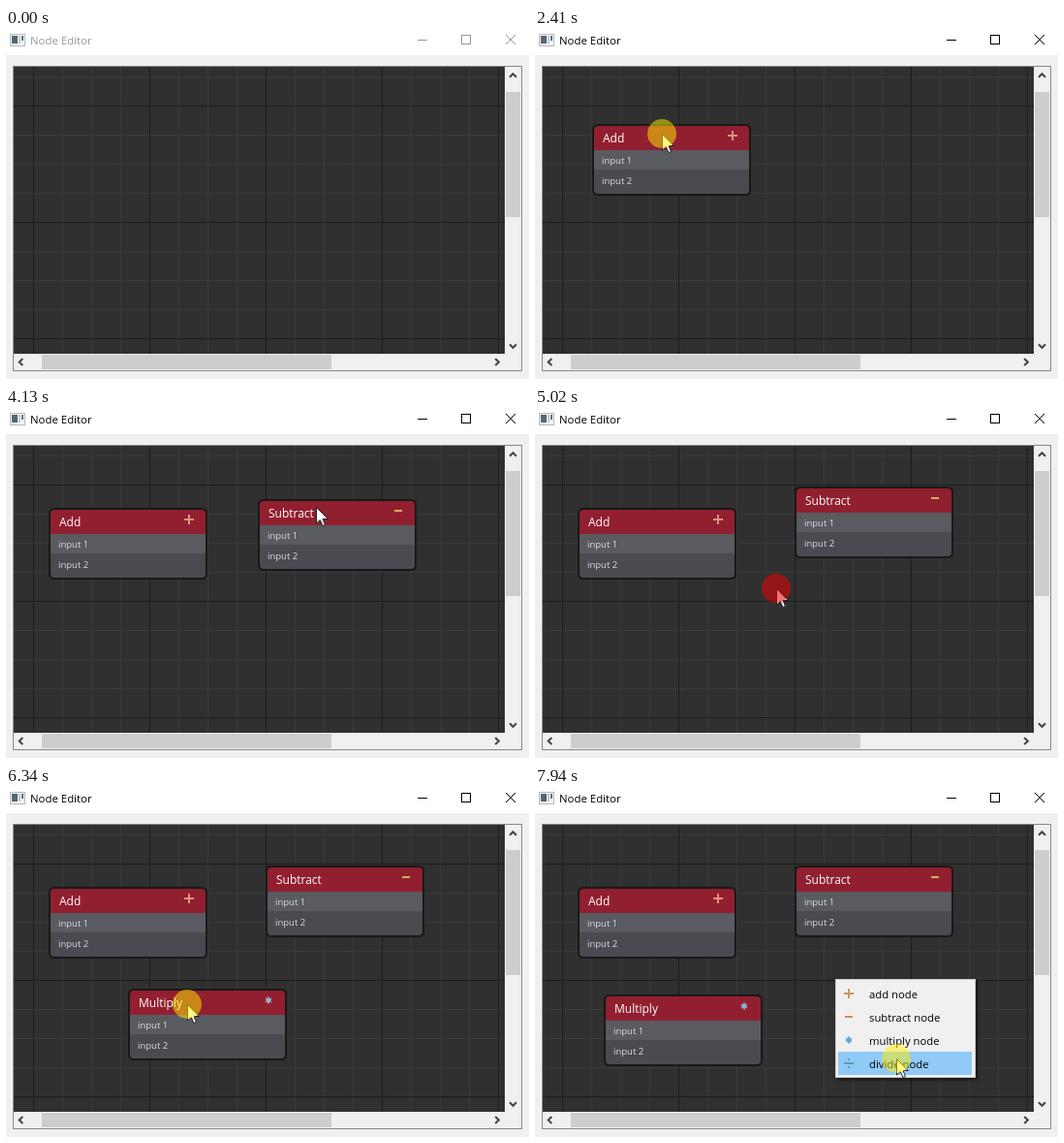
Animation of 540x362 px, one loop 8 s. Source, as an HTML page with a canvas:

```html
<!DOCTYPE html>
<html lang="en">
<head>
<meta charset="utf-8">
<title>Node Editor</title>
<style>
  html, body { margin: 0; width: 100%; height: 100%; overflow: hidden; background: #f0f0f0; }
  canvas { display: block; }
</style>
</head>
<body>
<canvas id="stage" width="540" height="362"></canvas>
<script>
const stage = document.getElementById('stage').getContext('2d');
const overlay = Object.assign(document.createElement('canvas'), { width: 540, height: 362 }).getContext('2d');
let ctx = stage;

const LOOP = 8000, FIRST = 180, STEP = 100.6;
const FONT = '"Open Sans", "Noto Sans", sans-serif';
const ITEM = 24;

const kinds = [
  { label: 'add node', title: 'Add', icon: 'plus', menuInk: '#c29a66', nodeInk: '#df9280' },
  { label: 'subtract node', title: 'Subtract', icon: 'minus', menuInk: '#c29848', nodeInk: '#d9ab62' },
  { label: 'multiply node', title: 'Multiply', icon: 'star', menuInk: '#52a4d8', nodeInk: '#92b6d0' },
  { label: 'divide node', icon: 'divide', menuInk: '#5c9fa8' }
];

// One act per node, timed in steps: leave, open the menu, pick an item, drag the node
const acts = [
  { leave: 0, open: 8, at: [76, 95], pick: 15, target: [128, 108],
    grab: 21, drag: [[146, 103], [131, 109], [116, 114]] },
  { leave: 25, open: 30, at: [262, 97], pick: 35, target: [312, 137],
    grab: 41, drag: [[320, 103], [327, 92], [328, 90]] },
  { leave: 44, open: 49, at: [249, 187], pick: 55, target: [299, 251],
    grab: 59, drag: [[308, 201], [248, 213], [187, 225], [126, 235], [132, 231]] },
  { leave: 66, open: 71, at: [310, 199], pick: 77, target: [373, 281], grab: Infinity, drag: [] }
];
acts.forEach((act, i) => {
  act.kind = kinds[i];
  act.drop = act.grab + act.drag.length - 1;
});

function buildPath() {
  let last = [112, 346];
  const keys = [];
  const moveTo = (from, to, point) => {
    keys.push([from, last], [to, point]);
    last = point;
  };
  for (const act of acts) {
    moveTo(act.leave, act.open - 1, act.at);
    moveTo(act.open + 1, act.open + 4, act.target);
    if (act.drag.length) moveTo(act.pick + 1, act.pick + 3, act.drag[0]);
    act.drag.forEach((point, i) => moveTo(act.grab + i, act.grab + i, point));
  }
  return keys;
}
const path = buildPath();

const ease = k => k < 0.5 ? 2 * k * k : 1 - 2 * (1 - k) ** 2;

function pointer(step) {
  const next = path.findIndex(key => key[0] > step);
  if (next < 0) return path[path.length - 1][1];
  if (next === 0) return path[0][1];
  const [s0, p0] = path[next - 1];
  const [s1, p1] = path[next];
  const k = ease((step - s0) / (s1 - s0));
  return p0.map((v, i) => Math.round(v + (p1[i] - v) * k));
}

function box(x, y, w, h, color) {
  ctx.fillStyle = color;
  ctx.fillRect(x, y, w, h);
}

function line(points, color, width) {
  ctx.beginPath();
  points.forEach(([x, y]) => ctx.lineTo(x, y));
  ctx.strokeStyle = color;
  ctx.lineWidth = width;
  ctx.stroke();
}

function frame(x, y, w, h, color) {
  ctx.strokeStyle = color;
  ctx.lineWidth = 1;
  ctx.strokeRect(x + 0.5, y + 0.5, w - 1, h - 1);
}

function text(str, x, y, size, color, weight = 400) {
  ctx.font = `${weight} ${size}px ${FONT}`;
  ctx.fillStyle = color;
  ctx.fillText(str, x, y);
}

function drawIcon(kind, x, y, color) {
  if (kind === 'star') {
    for (let i = 0; i < 3; i++) {
      const a = Math.PI / 2 + i * Math.PI / 3;
      const dx = 3.4 * Math.cos(a), dy = 3.4 * Math.sin(a);
      line([[x - dx, y - dy], [x + dx, y + dy]], color, 1.8);
    }
    return;
  }
  const half = kind === 'minus' ? 4 : 5;
  box(x - half, y - 1, half * 2, 2, color);
  if (kind === 'plus') box(x - 1, y - 5, 2, 10, color);
  if (kind === 'divide') {
    box(x - 1, y - 5, 2, 2, color);
    box(x - 1, y + 3, 2, 2, color);
  }
}

function drawTitleBar(active) {
  const ink = active ? '#000' : '#999';
  box(0, 0, 540, 28, '#fff');
  box(5, 7, 14, 11, '#f4f5f5');
  frame(4, 6, 16, 13, '#b4b9bc');
  box(6, 8, 6, 8, '#566772');
  box(13, 8, 2, 8, '#c3c9cc');
  box(16, 8, 2, 5, '#65717a');
  text('Node Editor', 25, 17, 11.4, ink);
  box(425, 12, 10, 1, ink);
  frame(470, 7, 10, 10, ink);
  line([[516, 7], [526, 17]], ink, 1);
  line([[526, 7], [516, 17]], ink, 1);
}

function drawChevron(x, y, angle) {
  ctx.save();
  ctx.translate(x, y);
  ctx.rotate(angle);
  line([[-1.8, -3.5], [1.8, 0], [-1.8, 3.5]], '#484848', 2.1);
  ctx.restore();
}

function drawView() {
  box(7, 39, 526, 315, '#828790');
  box(8, 40, 524, 313, '#f0f0f0');
  box(8, 40, 507, 296, '#303030');
  for (const [gap, color] of [[30, '#3a3a3a'], [120, '#1d1d1d']]) {
    for (let x = 28; x < 515; x += gap) box(x, 40, 1, 296, color);
    for (let y = gap === 30 ? 50 : 80; y < 336; y += gap) box(8, y, 507, 1, color);
  }
  // Darker lines stay whole where the fine ones cross them
  box(516, 66, 15, 129, '#cdcdcd');
  box(37, 337, 299, 15, '#cdcdcd');
  drawChevron(523.5, 49, -Math.PI / 2);
  drawChevron(523.5, 328, Math.PI / 2);
  drawChevron(15.5, 344.5, Math.PI);
  drawChevron(507, 344.5, 0);
}

function drawNode({ kind, at, pick, grab, drop, drag }, step) {
  if (step <= pick) return;
  const held = pointer(Math.min(Math.max(step, grab), drop));
  ctx.save();
  ctx.translate(at[0] - 2 + held[0] - drag[0][0], at[1] - 2 + held[1] - drag[0][1]);
  ctx.beginPath();
  ctx.roundRect(0, 0, 164, 74, 5.5);
  ctx.fillStyle = '#191919';
  ctx.fill();
  ctx.save();
  ctx.beginPath();
  ctx.roundRect(2, 2, 160, 70, 4);
  ctx.clip();
  box(2, 2, 160, 25, '#911f2f');
  box(2, 27, 160, 20, '#595b60');
  box(2, 47, 160, 25, '#4a4a50');
  ctx.restore();
  text(kind.title, 11, 19, 12, '#fff', 500);
  text('input 1', 10, 41, 9.5, '#dcdcde');
  text('input 2', 10, 62, 9.5, '#dcdcde');
  drawIcon(kind.icon, 145, 12, kind.nodeInk);
  ctx.restore();
}

function drawMenu({ at, open, pick }, step, tip) {
  if (step < open || step > pick) return;
  const fading = step === open;
  const [dx, dy] = [tip[0] - at[0] - 3, tip[1] - at[1] - 3];
  ctx = overlay;
  ctx.clearRect(0, 0, 540, 362);
  ctx.save();
  ctx.translate(...at);
  if (!fading) {
    ctx.shadowColor = 'rgba(0,0,0,.6)';
    ctx.shadowBlur = 3;
    ctx.shadowOffsetX = ctx.shadowOffsetY = 2;
  }
  box(0, 0, 145, 102, '#f0f0f0');
  ctx.shadowColor = 'transparent';
  frame(0, 0, 145, 102, '#ccc');
  kinds.forEach(({ label, icon, menuInk }, i) => {
    const y = i * ITEM;
    if (dx > 0 && dy > y && dy <= y + ITEM) box(3, 3 + y, 138, ITEM, '#91c9f7');
    drawIcon(icon, 14, 15 + y, menuInk);
    text(label, 35, 20 + y, 11.3, '#000');
  });
  ctx.restore();
  ctx = stage;
  ctx.globalAlpha = fading ? 0.5 : 1;
  ctx.drawImage(overlay.canvas, 0, 0);
  ctx.globalAlpha = 1;
}

function drawPointer(step, [x, y]) {
  const arrow = [[0, 0], [0, 16.5], [3.8, 13], [6.4, 19], [9, 18], [6.5, 12], [11.8, 12]];
  ctx.save();
  ctx.translate(x + 0.5, y + 0.5);
  ctx.beginPath();
  arrow.forEach(([a, b]) => ctx.lineTo(a, b));
  ctx.closePath();
  ctx.fillStyle = '#fff';
  ctx.fill();
  ctx.strokeStyle = '#222';
  ctx.lineWidth = 1;
  ctx.stroke();
  ctx.restore();

  const right = acts.some(a => step === a.open - 1);
  const left = acts.some(a => step === a.pick || (step >= a.grab && step <= a.drop + 1));
  if (!right && !left) return;
  ctx.beginPath();
  ctx.arc(x, y, 15, 0, Math.PI * 2);
  ctx.fillStyle = right ? 'rgba(230,0,0,.55)' : 'rgba(255,240,0,.5)';
  ctx.fill();
}

function draw(time) {
  const step = Math.floor((time % LOOP - FIRST) / STEP);
  const tip = pointer(step);
  box(0, 0, 540, 362, '#f0f0f0');
  drawTitleBar(step >= acts[0].open - 1);
  drawView();
  acts.forEach(act => drawNode(act, step));
  acts.forEach(act => drawMenu(act, step, tip));
  if (step >= 0) drawPointer(step, tip);
}

const start = performance.now();
function tick() {
  draw(performance.now() - start);
  requestAnimationFrame(tick);
}
tick();
</script>
</body>
</html>
```
